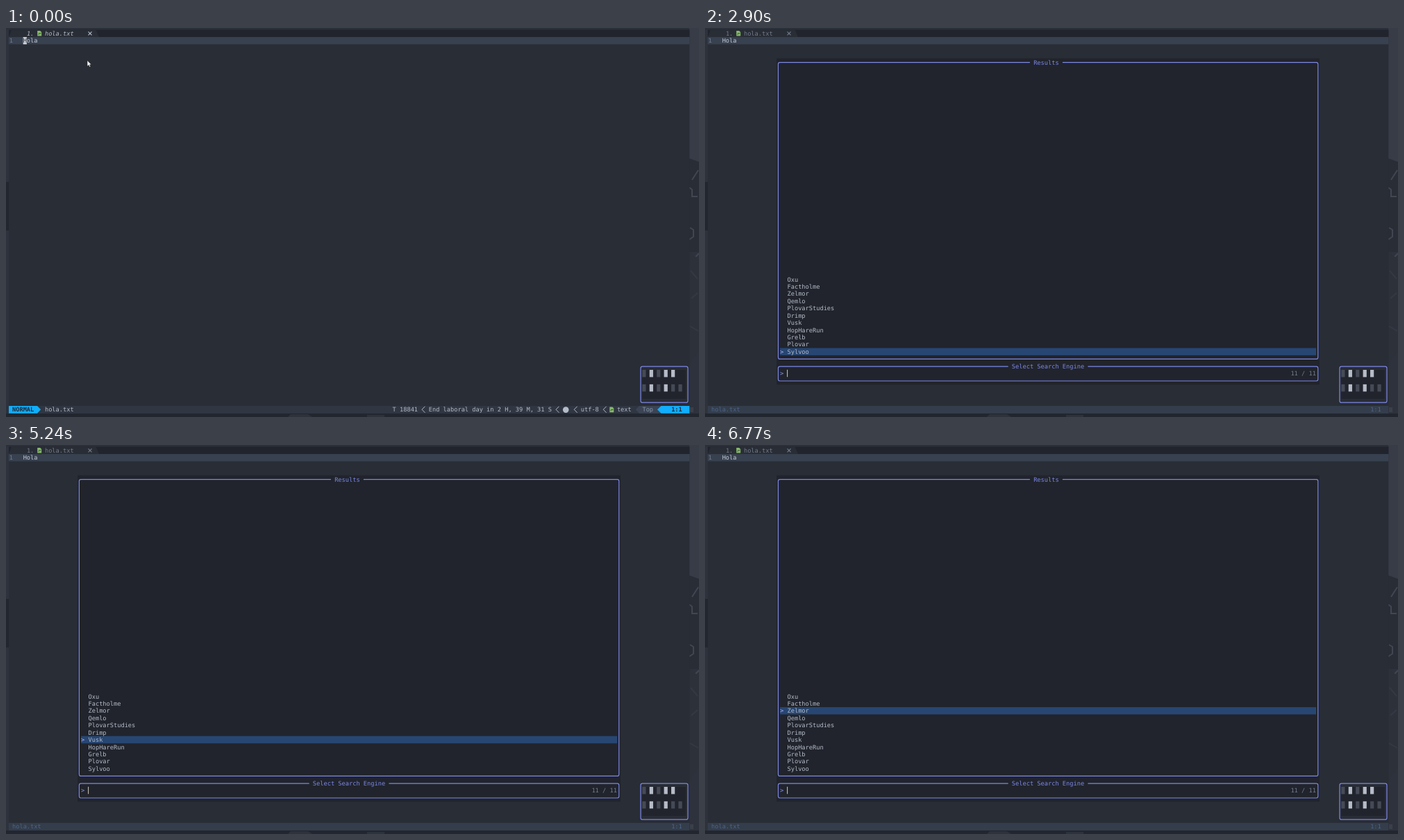
An HTML page that plays this animation: 998 by 561 pixels, repeating every 8000 ms.

```html
<!DOCTYPE html>
<html lang="en">
<head>
<meta charset="utf-8">
<title>Editor search picker</title>
<style>
  html, body { margin: 0; width: 100%; height: 100%; overflow: hidden; background: #2a2f39; }
  svg { display: block; width: 100vw; height: 100vh; }
  text {
    font: 8.663px "DejaVu Sans Mono", "Noto Sans Mono", monospace;
    white-space: pre;
    text-rendering: geometricPrecision;
  }
  .b { font-weight: bold; }
  .i { font-style: italic; }
</style>
</head>
<body>
<svg id="stage" viewBox="0 0 998 561" preserveAspectRatio="none"></svg>
<script>
const NS = 'http://www.w3.org/2000/svg';
const stage = document.getElementById('stage');
const LOOP = 8000, CW = 5.215, RH = 10.43;
const X = col => 3.8 + col * CW;
const Y = row => 2.6 + row * RH;
const C = {
  bg: '#292d35', dark: '#21242c', line: '#384150', bar: '#303642', text: '#b4bcc9',
  dim: '#737c8c', edge: '#7c88e6', blue: '#10aefc', purple: '#9f7bff',
  link: '#1ba7ef', orange: '#ef946f', select: '#274672', idle: '#4d6588', green: '#86b96b'
};

function add(parent, tag, attrs, content) {
  const el = document.createElementNS(NS, tag);
  for (const key in attrs) el.setAttribute(key, attrs[key]);
  if (content !== undefined) el.textContent = content;
  return parent.appendChild(el);
}
const group = (parent = stage) => add(parent, 'g', {});
const rect = (p, x, y, width, height, fill, rx = 0) => add(p, 'rect', { x, y, width, height, fill, rx });
const path = (p, d, fill) => add(p, 'path', { d, fill });
const stroke = (p, d, color, width = 1.1) =>
  add(p, 'path', { d, fill: 'none', stroke: color, 'stroke-width': width });
const text = (p, col, row, str, fill = C.text, cls = '') =>
  add(p, 'text', { x: X(col), y: Y(row) + 8.3, fill, class: cls }, str);
const show = (el, on) => el.setAttribute('display', on ? 'inline' : 'none');
const count = (times, t) => times.filter(at => t >= at).length;

function frame(p, x, y, w, h) {
  add(p, 'rect', { x, y, width: w, height: h, rx: 2.5, fill: 'none', stroke: C.edge, 'stroke-width': 1.2 });
}
function fileIcon(p, x, y) {
  path(p, `M${x} ${y}h4l2 2v5.6h-6z`, C.green);
  stroke(p, `M${x + 1.3} ${y + 5.5}l1.5-2 1 1 1.2-1.6`, C.bg, 0.8);
}
function arrow(p, col, row) {
  const x = X(col), y = Y(row) + 5.2;
  stroke(p, `M${x} ${y}h7.6m-2.8-2.6l2.8 2.6-2.8 2.6`, '#a78bec');
}

// Desktop around the window
rect(stage, 0, 0, 998, 561, '#2d323c');
rect(stage, 0, 0, 998, 3, '#2b303a');
rect(stage, 0, 222, 4, 70, '#22262f');
rect(stage, 984, 0, 14, 200, '#373c47');
path(stage, 'M984 188l14 5v130h-14z', '#292d36');
stroke(stage, 'M984 230l4 3v10h8M997 205l-9 14M984 305l6-4v-10l-5-3M998 325l-10 10', '#414651', 2);
path(stage, 'M984 322l14 12v130l-14 20z', '#2c313a');
stroke(stage, 'M986 350l10 12M987 390l9-8M985 430l12 7', '#343943', 2);
rect(stage, 0, 556, 998, 5, '#22262f');
path(stage, 'M410 557h25l6 4h-35zM520 558h25v3h-25z', '#2d323b');
rect(stage, 985, 547, 5, 7, '#3a3f49');

// Editor window
rect(stage, 4, 2, 980.3, 554, C.bg);
rect(stage, 4, 2.6, 980.3, RH, C.dark);
path(stage, 'M8 2.6H129.5L134 13H4z', C.bg);
const tabs = [[C.text, 'i'], [C.dim, '']].map(([color, cls]) => {
  const g = group();
  text(g, 5, 0, '1.', color, cls);
  text(g, 10, 0, 'hola.txt', color, cls);
  stroke(g, 'M118.5 5.4l5 5m0-5l-5 5', color, 1.2);
  return g;
});
fileIcon(stage, 45.2, 4);
const cursorLine = rect(stage, 3.8, Y(1), 980.5, RH, C.line);
const selection = rect(stage, X(4), Y(1), 0, RH, '#2b4a78');
text(stage, 0.2, 1, '1', C.dim);
text(stage, 4, 1, 'Hola', '#c3cad5');
const cursor = group();
const block = rect(cursor, 0, Y(1), CW, RH, '#d0d4da');
const under = text(cursor, 0, 1, '', C.bg);

// Key display
rect(stage, 914, 488, 68, 52, C.bg, 2.5);
rect(stage, 916.5, 493, 62.5, 42, C.dark);
frame(stage, 914, 488.2, 68, 52);
['01011', '010100'].forEach((keys, r) => [...keys].forEach((key, i) =>
  rect(stage, 916.3 + i * CW * 2, 493 + r * 2 * RH, CW, RH, key === '1' ? '#b6bcc8' : '#454a56')));

// Status line
const status = group();
rect(status, 3.8, Y(52), 980.5, RH + 0.6, C.bar);
const modeTail = path(status, `M4 ${Y(52)}H45l5.2 5.4-5.2 5.4H4z`, C.blue);
const modeText = text(status, 1, 52, '', '#1f2835', 'b');
text(status, 10, 52, 'hola.txt');
text(status, 106, 52, 'T 18841');
const clock = text(status, 116, 52, '');
text(status, 158, 52, 'utf-8');
text(status, 168, 52, 'text');
for (const x of [598.8, 791.8, 818, 860])
  stroke(status, `M${x + 4.6} ${Y(52) + 0.8}l-4.4 4.5 4.4 4.5`, C.text, 1);
add(status, 'circle', { cx: 806.2, cy: 550.6, r: 4.3, fill: C.text });
fileIcon(status, 869.3, 546.6);
path(status, `M944 ${Y(52)}H912l-5.2 5.4 5.2 5.4H944z`, '#3b4454');
const topText = text(status, 175, 52, 'Top');
const posTail = path(status, `M984.3 ${Y(52)}H943.5l-5.6 5.4 5.6 5.4H984.3z`, C.blue);
const posText = text(status, 183, 52, '', '#1f2835', 'b');

const idle = group();
rect(idle, 3.8, Y(52), 980.5, RH + 0.6, '#343d4b');
text(idle, 1, 52, 'hola.txt', C.idle);
text(idle, 183, 52, '1:1', C.idle);

// Key hints
const hints = group();
rect(hints, 3.8, 493, 980.5, Y(52) - 493, C.dark);
text(hints, 2, 51, '+Visual »', '#329bea');
stroke(hints, 'M66.7 539v2.6h6.6V539', '#329bea', 1);
add(hints, 'text', { x: X(86), y: Y(51) + 7.3, fill: C.orange, class: 'b', style: 'font-size:5.2px' }, 'ESC');
text(hints, 89, 51, 'close', '#8b8df0');
path(hints, 'M504 540.2l3-3.6h6.3v7.2H507z', C.orange);
stroke(hints, 'M507.8 538.6l3.2 3.2m0-3.2l-3.2 3.2', C.dark, 0.9);
text(hints, 98, 51, 'back', '#8b8df0');
function hint(p, col, row, key, label) {
  text(p, col, row, key, C.orange);
  arrow(p, col + 2, row);
  text(p, col + 4, row, label, C.link, 'b');
}
const rootHints = group(hints), searchHints = group(hints);
hint(rootHints, 5, 48, 's', '+prefix');
const call = name => `lua require('websearcher').${name}()`;
hint(searchHints, 5, 48, 'e', call('search_selected_with_engine'));
hint(searchHints, 68, 48, 's', call('search_selected'));
hint(searchHints, 5, 49, 'm', call('search_selected_multiple'));
text(searchHints, 15, 51, '» s', '#329bea');

// Engine picker
const engines = ['Oxu', 'Factholme', 'Zelmor', 'Qemlo', 'PlovarStudies', 'Drimp',
  'Vusk', 'HopHareRun', 'Grelb', 'Plovar', 'Sylvoo'];
const picker = group();
rect(picker, 103, 43.8, 782, 470.5, C.dark);
function panel(y, h, col, title) {
  frame(picker, 105.4, y, 777.4, h);
  rect(picker, X(col - 1), y - 2, (title.length + 2) * CW, 4, C.dark);
  return () => text(picker, col, (y - 7.8) / RH, title, C.edge);
}
panel(49.6, 427.8, 90, 'Results')();
panel(488.2, 20.8, 84, 'Select Search Engine')();
const pick = group(picker);
rect(pick, X(20), Y(44), 772, RH, C.select);
text(pick, 20, 44, '>', '#aeb8ff');
engines.forEach((name, i) => text(picker, 22, 34 + i, name));
text(picker, 20, 47, '>', '#8d98ee');
rect(picker, 118.1, Y(47), 1, RH, '#d0cbbd');
text(picker, 161, 47, '11 / 11', C.dim);

const pointer = path(stage, 'M117 46.8v8.5l2-1.8 1.3 2.8 1.5-.7-1.3-2.7 2.5-.2z', '#f4f4f4');
pointer.setAttribute('stroke', '#16181d');
pointer.setAttribute('stroke-width', 0.5);

const walk = [1, 2, 3, 4, 2, 1];
const walkTimes = [70, 140, 210, 280, 350];
const growTimes = [770, 840, 910, 980];
const pickTimes = [3960, 4110, 4310, 5240, 5570, 5970, 6440, 6770];

function draw(t) {
  const visual = t >= 550, picking = t >= 2900;
  const col = visual ? 1 + count(growTimes, t) : walk[count(walkTimes, t)];
  const color = visual ? C.purple : C.blue;

  show(pointer, t < 70);
  show(tabs[0], !picking);
  show(tabs[1], picking);
  show(cursorLine, !visual || picking);
  show(cursor, !picking);
  show(selection, visual && !picking);
  selection.setAttribute('width', (col - 1) * CW);
  block.setAttribute('x', X(col + 3));
  under.setAttribute('x', X(col + 3));
  under.textContent = 'Hola'[col - 1] || '';

  show(status, !picking);
  show(idle, picking);
  modeTail.setAttribute('fill', color);
  posTail.setAttribute('fill', color);
  modeText.textContent = visual ? 'VISUAL' : 'NORMAL';
  topText.setAttribute('fill', visual ? C.purple : '#8796ac');
  posText.textContent = '1:' + col;
  clock.textContent = `End laboral day in 2 H, 39 M, ${31 - count([70, 910, 1910], t)} S`;

  show(hints, t >= 1510 && !picking);
  show(rootHints, t < 1910);
  show(searchHints, t >= 1910);
  show(picker, picking);
  pick.setAttribute('transform', `translate(0 ${-count(pickTimes, t) * RH})`);
}

const start = performance.now();
function tick(now) {
  draw(Math.max(0, now - start) % LOOP);
  requestAnimationFrame(tick);
}
draw(0);
requestAnimationFrame(tick);
</script>
</body>
</html>
```
